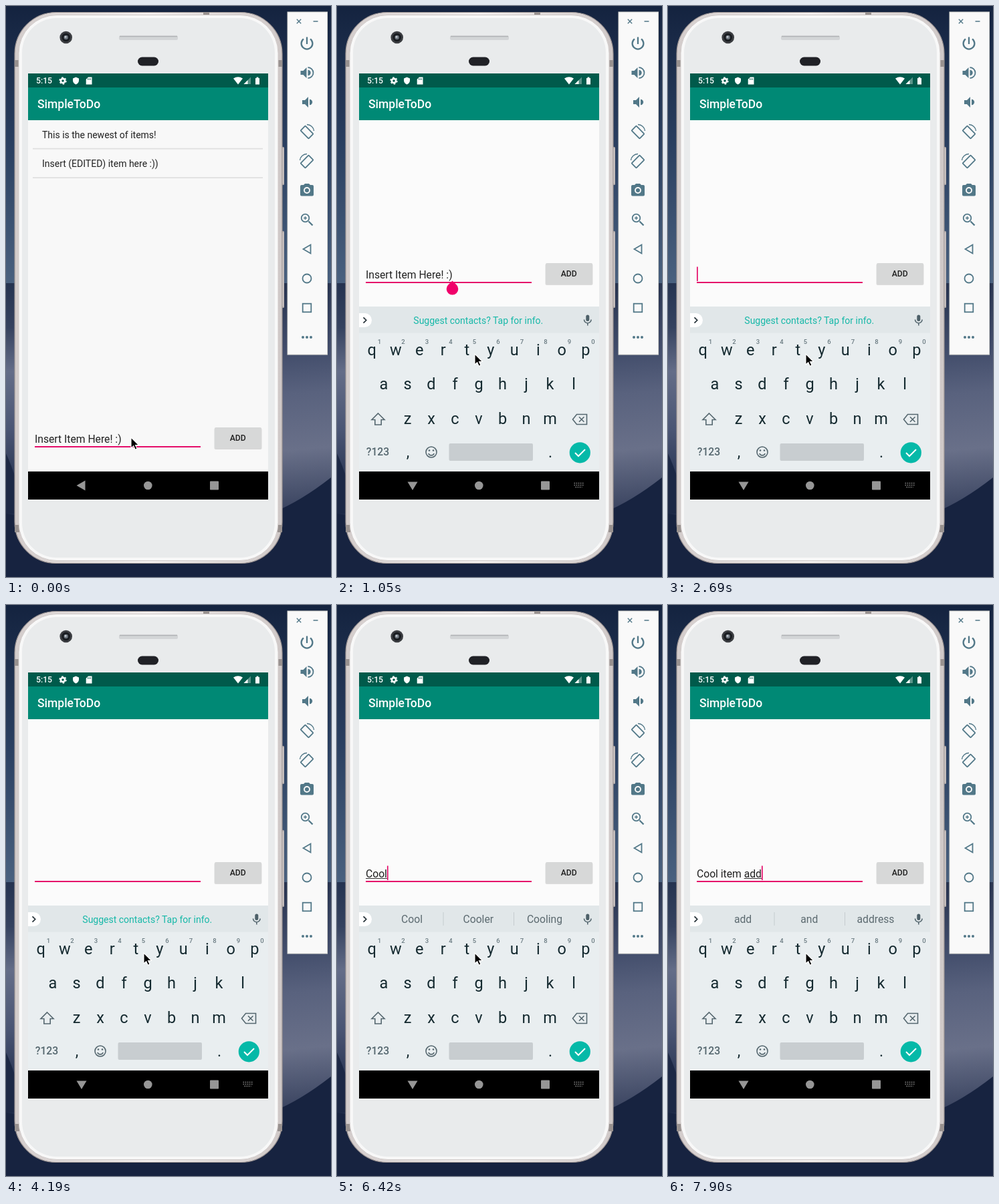
Animation, 486 px wide and 855 px high, one loop 8 s. Source, as an HTML page:

```html
<!DOCTYPE html>
<html lang="en">
<head>
<meta charset="utf-8">
<title>To-do list demo</title>
<style>
  html, body { margin: 0; width: 100%; height: 100%; overflow: hidden; background: #1a2744; }
  svg { display: block; width: 486px; height: 855px; }
  text { font-family: Roboto, sans-serif; white-space: pre; }
  .mid { text-anchor: middle; }
  .tool { fill: #527888; }
  .line { fill: none; stroke: #527888; stroke-width: 1.8; }
  .thin { stroke-width: 1.4; }
  .bold { stroke-width: 2.3; }
  .key { fill: none; stroke: #55676f; stroke-width: 1.6; }
</style>
</head>
<body>
<svg viewBox="0 0 486 855">
  <defs>
    <linearGradient id="sky" x2="0" y2="1">
      <stop offset="0" stop-color="#14233f"/><stop offset=".5" stop-color="#2a3f60"/>
      <stop offset="1" stop-color="#4a617f"/>
    </linearGradient>
    <linearGradient id="sand" x2="0" y2="1">
      <stop offset="0" stop-color="#253350"/><stop offset=".15" stop-color="#35425f"/>
      <stop offset=".3" stop-color="#646d88"/><stop offset=".5" stop-color="#4a5574"/>
      <stop offset=".7" stop-color="#26324f"/><stop offset="1" stop-color="#14203c"/>
    </linearGradient>
    <linearGradient id="dune" gradientUnits="userSpaceOnUse" x1="430" y1="415" x2="460" y2="780">
      <stop offset="0" stop-color="#27334f"/><stop offset=".28" stop-color="#424d6b"/>
      <stop offset=".45" stop-color="#59627e"/><stop offset=".68" stop-color="#697089"/>
      <stop offset="1" stop-color="#2b3653"/>
    </linearGradient>
    <linearGradient id="rim" x2="1" y2="0">
      <stop offset="0" stop-color="#d3cccb"/><stop offset=".5" stop-color="#f3efee"/>
      <stop offset="1" stop-color="#cfc8c7"/>
    </linearGradient>
    <clipPath id="screen"><rect x="33" y="101" width="359" height="638"/></clipPath>
  </defs>

  <!-- desktop -->
  <rect width="486" height="416" fill="url(#sky)"/>
  <rect y="415" width="400" height="440" fill="url(#sand)"/>
  <rect x="400" y="415" width="86" height="440" fill="url(#dune)"/>
  <path d="M0 670Q14 700 30 760H0Z" fill="#1c2845"/>
  <path d="M0 760Q240 800 400 758Q440 742 486 706V855H0Z" fill="#172340"/>

  <!-- phone -->
  <g fill="#b9b1b0"><rect x="411" y="211" width="5" height="57" rx="1.5"/><rect x="411" y="337" width="5" height="115" rx="1.5"/></g>
  <g fill="#e4dedd"><rect x="411" y="213" width="3.5" height="53"/><rect x="411" y="339" width="3.5" height="111"/></g>
  <rect x="13" y="9.5" width="400" height="825" rx="62" fill="url(#rim)" stroke="#9c9493" stroke-width="1.2"/>
  <g fill="#98918f">
    <rect x="13" y="81" width="7" height="10"/><rect x="406" y="81" width="7" height="10"/>
    <rect x="13" y="777" width="7" height="11"/><rect x="406" y="777" width="7" height="11"/>
    <rect x="295" y="9" width="9" height="4"/>
  </g>
  <rect x="19" y="13.5" width="388" height="817" rx="57" fill="#f8f8f8" stroke="#d0cac9"/>
  <rect x="24" y="18" width="378" height="808" rx="52" fill="#e9ebec"/>
  <circle cx="89.700" cy="47" r="9.3" fill="#3b3d41"/><circle cx="89.700" cy="47" r="6.3" fill="#191c20"/>
  <circle cx="89.700" cy="47" r="3.2" fill="#6c747d"/><circle cx="89" cy="46.300" r="1.5" fill="#c0c6cc"/>
  <rect x="169" y="44.500" width="88" height="6.500" rx="2" fill="#d3d5d7"/>
  <path d="M170 45.500H256" stroke="#b0b2b5" stroke-width="1.500"/>
  <rect x="197" y="76.500" width="31" height="13" rx="6.500" fill="#202126"/>

  <!-- app -->
  <g clip-path="url(#screen)">
    <rect id="page" x="33" y="101" width="359" height="600"/>
    <rect x="33" y="101" width="359" height="21" fill="#005a4b"/>
    <rect x="33" y="122" width="359" height="49" fill="#008975"/>
    <text x="47" y="153" font-size="17.5" font-weight="500" fill="#fff">SimpleToDo</text>
    <g fill="#fff">
      <text x="45" y="116" font-size="12.2" font-weight="500">5:15</text>
      <circle cx="85" cy="112" r="3.100" fill="none" stroke="#fff" stroke-width="2.600"/>
      <circle cx="85" cy="112" r="4.900" fill="none" stroke="#fff" stroke-width="1.500" stroke-dasharray="2.6 2.53"/>
      <path d="M104.500 106.500L109 108.400V112Q108.600 115.800 104.500 117.500Q100.400 115.800 100 112V108.400Z"/>
      <path d="M123 106.500H128.500V117.500H119.700V110Z"/>
      <path d="M122.500 108.500V110.500M124.500 108.500V110.500M126.500 108.500V110.500" stroke="#005a4b"/>
      <path d="M347 117.500L340 108.600Q347 103.800 354 108.600Z"/>
      <path d="M366 106.500V117H355.500Z" opacity=".35"/><path d="M361.500 111V117H355.500Z"/>
      <path d="M373 108H374.600V106.500H377.400V108H379V117.500H373Z"/>
    </g>
    <g id="list" fill="#212121" font-size="14">
      <text x="54" y="198">This is the newest of items!</text>
      <text x="54" y="241">Insert (EDITED) item here :))</text>
      <path d="M40 213.700H384M40 257.200H384" stroke="#e0e0e0" stroke-width="1.800"/>
    </g>
    <g id="form">
      <text id="input" x="43" y="408" font-size="15.7" fill="#212121"></text>
      <path id="under" stroke="#333" stroke-width="1"/>
      <path d="M43 414H291" stroke="#e50b69" stroke-width="2"/>
      <rect id="caret" y="390.500" width="1.700" height="21.500" fill="#e50b69"/>
      <g id="handle" fill="#f0006a"><circle cx="172.500" cy="423.800" r="8.800"/><path d="M172.500 411.500L178.700 417.600H166.300Z"/></g>
      <rect x="311.500" y="386" width="71" height="32" rx="2" fill="#000" opacity=".13"/>
      <rect x="312" y="385" width="70" height="31.500" rx="1.800" fill="#d7d8d8"/>
      <text class="mid" x="346.700" y="405.300" font-size="12.2" font-weight="500" fill="#202020">ADD</text>
    </g>
    <g id="board">
      <rect x="33" y="450" width="359" height="250" fill="#e9eef0"/>
      <rect x="33" y="450" width="359" height="39.500" fill="#e1e7e9"/>
      <path d="M33 460H41.500A10.500 10.500 0 0 1 41.500 481H33Z" fill="#fff"/>
      <path d="M39.500 466.300L43.700 470.500L39.500 474.700" fill="none" stroke="#263238" stroke-width="1.700"/>
      <text id="hint" class="mid" x="211.300" y="475.500" font-size="14" fill="#16b8a8">Suggest contacts? Tap for info.</text>
      <g id="words" font-size="15.7" fill="#5c6a70">
        <path d="M159 460V480M264.500 460V480" stroke="#c5cccf"/>
        <text class="mid" x="112" y="476"></text><text class="mid" x="211.300" y="476"></text><text class="mid" x="310.500" y="476"></text>
      </g>
      <rect x="372.300" y="462.500" width="5" height="9.500" rx="2.500" fill="#4d6068"/>
      <path class="key" d="M369.500 469.500A5.300 5.300 0 0 0 380.100 469.500M374.800 475V478.500"/>
      <g id="keys"></g>
      <path class="key" d="M61.500 610L71 619.500H66.200V627H56.800V619.500H52Z"/>
      <path class="key" d="M352.500 619L358.500 611.500H373.500V626.500H358.500ZM362 615.300L369.500 622.800M369.500 615.300L362 622.800"/>
      <text class="mid" x="61" y="673" font-size="15.7" font-weight="500" fill="#55676f">?123</text>
      <g class="key"><circle cx="141" cy="668" r="8"/><path d="M136.800 670A4.500 4.500 0 0 0 145.200 670"/></g>
      <circle cx="138" cy="665.500" r="1.300" fill="#55676f"/><circle cx="144" cy="665.500" r="1.300" fill="#55676f"/>
      <rect x="167.500" y="655" width="125.500" height="26" rx="2" fill="#c8cdd0"/>
      <circle cx="363.300" cy="668.800" r="15.600" fill="#05b9a8"/>
      <path d="M356 669L361 674L371 664" fill="none" stroke="#fff" stroke-width="2"/>
    </g>
    <rect x="33" y="697" width="359" height="42" fill="#000"/>
    <g fill="#969696">
      <path id="back"/>
      <circle cx="212.300" cy="718" r="6.300"/><rect x="305" y="711.500" width="13" height="13" rx=".8"/>
      <path id="dots" d="M354.500 714.500H368.500M354.500 717.500H368.500M356.500 720.500H366.500" stroke="#858585" stroke-width="1.600" stroke-dasharray="1.6 1.5"/>
    </g>
  </g>

  <!-- emulator toolbar -->
  <rect x="421" y="9" width="59.500" height="513" fill="#f9f9f9" stroke="#d5d5cf"/>
  <path class="line thin" d="M434.800 19.800L441.200 26.200M441.200 19.800L434.800 26.200M459.500 23H466.500"/>
  <g id="tools"></g>

  <path id="mouse" d="M0 0V16L3.700 12.600L6.200 18.300L9 17.100L6.500 11.500H11.500Z" fill="#000" stroke="#fff" stroke-width="1.100"/>
</svg>
<script>
const $ = id => document.getElementById(id);
const show = (id, on) => $(id).setAttribute('visibility', on ? 'visible' : 'hidden');
const pen = document.createElement('canvas').getContext('2d');
const width = s => { pen.font = '15.7px Roboto, sans-serif'; return pen.measureText(s).width; };

// keyboard letters
const label = (x, y, size, s, fill = '#14292f', weight = 400) =>
  `<text class="mid" x="${x}" y="${y}" font-size="${size}" fill="${fill}" font-weight="${weight}">${s}</text>`;
const row = (s, x, y) => [...s].map((c, i) => label(x + i * 35.5, y, 23.5, c)).join('');
$('keys').innerHTML = row('qwertyuiop', 52.3, 522.5) + row('asdfghjkl', 70, 573.5) + row('zxcvbnm', 105.5, 625.5)
  + [...'1234567890'].map((c, i) => label(63.5 + i * 35.5, 505.5, 9.5, c, '#6a7a81', 500)).join('')
  + label(106, 676, 23, ',') + label(319, 676, 23, '.');

// toolbar icons, each drawn around its own centre
const speaker = x => `<path class="tool" d="M${x} -3h4l5 -5v16l-5 -5h-4z"/>`;
const wave = (x, r, look) => `<path class="${look}" d="M${x} ${-r}A${r} ${r} 0 0 1 ${x} ${r}"/>`;
const turn = flip => `<g class="line" transform="scale(${flip} 1)">
  <rect x="-5" y="-8.500" width="10" height="17" rx="1" transform="translate(0 1) rotate(-45)"/>
  <path class="thin" d="M0 -10.500A10.500 10.500 0 0 1 10.500 -1"/></g>`;
const icons = [
  '<path class="line bold" d="M0 -9.500V1M-5 -6.600A8.400 8.400 0 1 0 5 -6.600"/>',
  speaker(-9.5) + wave(1.5, 4.2, 'tool') + wave(1.5, 8, 'line'),
  speaker(-7) + wave(4, 4.2, 'tool'),
  turn(1),
  turn(-1),
  `<path class="tool" d="M-3 -10L-5 -8H-8Q-10 -8 -10 -6V6.500Q-10 8.500 -8 8.500H8Q10 8.500 10 6.500V-6Q10 -8 8 -8H5L3 -10Z"/>
   <circle r="4" fill="#527888" stroke="#f9f9f9" stroke-width="1.900"/>`,
  `<path class="line bold" d="M2.500 2.500L8.500 8.500"/><path class="line thin" d="M-5 -2.500H0M-2.500 -5V0"/>
   <circle class="line" cx="-2.500" cy="-2.500" r="5.800"/>`,
  '<path class="line" d="M5.500 -6.500V6.500L-5.500 0Z"/>',
  '<circle class="line" r="6.500"/>',
  '<rect class="line" x="-6.300" y="-6.300" width="12.600" height="12.600"/>',
  [-6, 0, 6].map(x => `<circle class="tool" cx="${x}" r="2"/>`).join('')
];
$('tools').innerHTML = icons.map((s, i) => `<g transform="translate(450 ${56 + i * 44})">${s}</g>`).join('');

// [start ms, text, caret on, suggestions]
const full = 'Insert Item Here! :)';
const typing = [
  [0, full, 0], [150, full, 1], [1050, full, 0], [1350, full.slice(0, 19), 1],
  ...[17, 14, 11, 8, 5, 2, 0].map((n, i) => [1790 + i * 148, full.slice(0, n), 1]),
  [3290, '', 0], [3740, '', 1], [4190, '', 0],
  [4340, 'I', 1], [4780, 'I', 0], [5080, '', 1], [5530, '', 0],
  [5670, 'C', 1, ''], [6120, 'Co', 1, 'Co Could Come'], [6270, 'Coo', 1, 'Cool Coo Cook'],
  [6420, 'Cool', 1, 'Cool Cooler Cooling'], [6570, 'Cool ', 1, 'and thanks I'],
  [7020, 'Cool i', 1, 'I in is'], [7170, 'Cool it', 1, 'it its item'],
  [7320, 'Cool item', 1, 'item items itemized'], [7470, 'Cool item ', 1, 'is for and'],
  [7610, 'Cool item a', 1, 'a and at'], [7760, 'Cool item ad', 1, 'ad add and'],
  [7900, 'Cool item add', 1, 'add and address']
];
// [start ms, x, y]
const pointer = [[0, 187, 646], [450, 194, 600], [600, 206, 521]];
const at = (steps, t) => steps.filter(s => s[0] <= t).pop();

function draw(t) {
  const [, text, caret, words] = at(typing, t);
  const [, mx, my] = at(pointer, t);
  const open = t >= 300, settled = t >= 450;

  $('page').setAttribute('fill', open ? '#fbfbfb' : '#f8f8f8');
  show('list', !open);
  show('board', open);
  show('dots', open);
  $('form').setAttribute('transform', `translate(0 ${open ? 0 : 246})`);
  $('board').setAttribute('transform', `translate(0 ${settled ? 0 : 1.3})`);
  $('board').setAttribute('opacity', settled ? 1 : 0.94);
  $('back').setAttribute('d', open ? 'M105.500 712.500H120.500L113 725Z' : 'M118.500 710.500V725.500L105.500 718Z');

  $('input').textContent = text;
  const end = 43 + width(text);
  $('caret').setAttribute('x', end);
  show('caret', caret);
  show('handle', t >= 150 && t < 1500);
  const word = t >= 1350 ? text.match(/[a-z]*$/i)[0] : '';
  $('under').setAttribute('d', word ? `M${end - width(word)} 409.500H${end}` : '');

  const suggest = words !== undefined;
  show('hint', open && !suggest);
  show('words', open && suggest);
  const list = (words || '').split(' ');
  $('words').querySelectorAll('text').forEach((el, i) => el.textContent = list[i] || '');

  $('mouse').setAttribute('transform', `translate(${mx} ${my})`);
}

function loop() {
  draw(performance.now() % 8000);
  requestAnimationFrame(loop);
}
loop();
</script>
</body>
</html>
```
